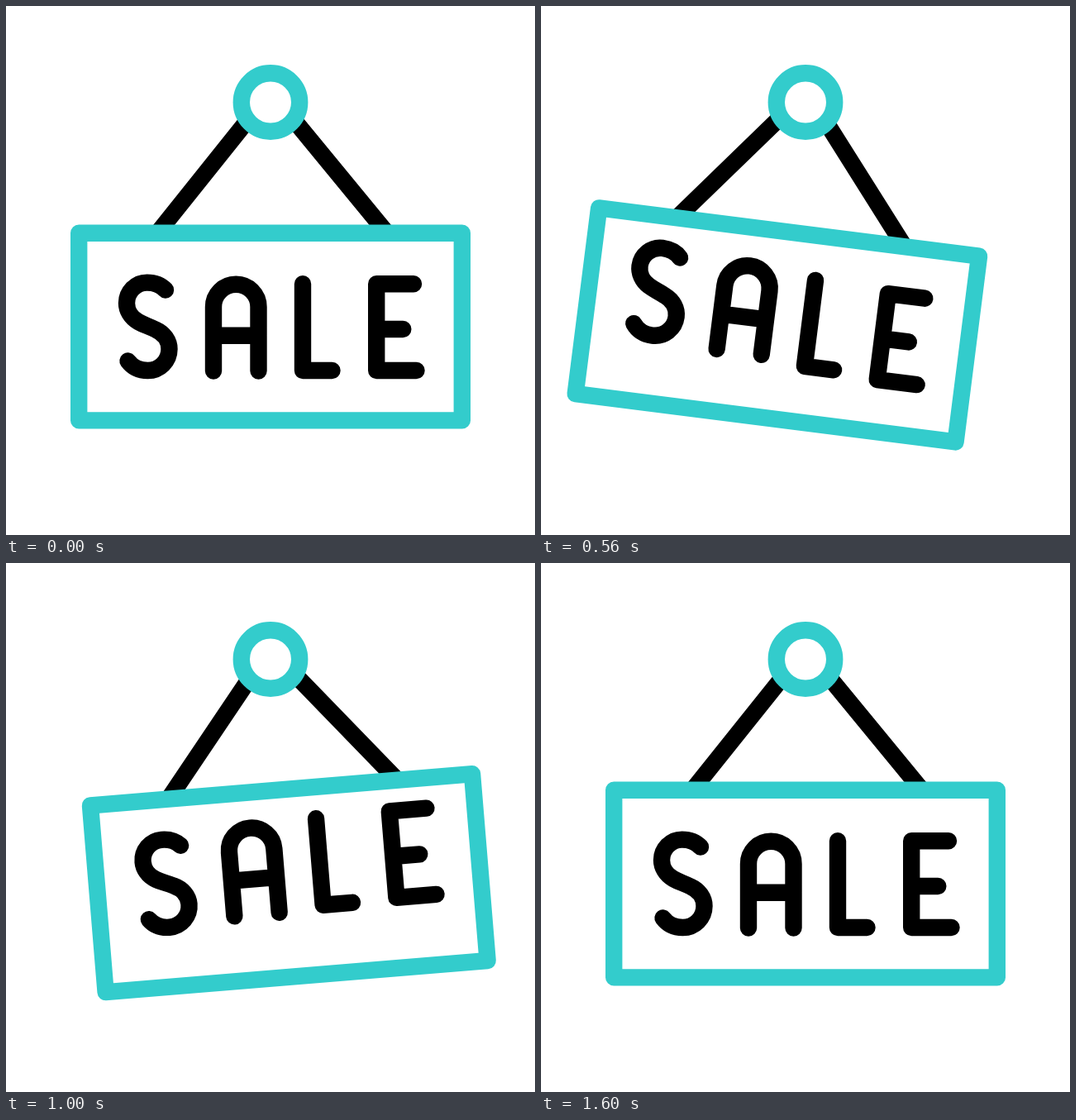
These frames come from a looping animation (640x640 px, 1680 ms). An HTML page with a canvas:

```html
<!DOCTYPE html>
<html lang="en">
<head>
<meta charset="utf-8">
<title>Swinging sale sign</title>
<style>
  html, body { margin: 0; width: 100%; height: 100%; overflow: hidden; background: #fff; }
  canvas { display: block; width: 100vw; height: 100vh; }
</style>
</head>
<body>
<canvas id="stage" width="640" height="640"></canvas>
<script>
const ctx = document.getElementById('stage').getContext('2d');

const LOOP = 1680, STEP = 40;
const TEAL = '#33cccc', LINE = 20.4;
const PIVOT = { x: 320, y: 116.5 };

// Swing keys: [time in ms, angle in degrees]
const SWING = [[40, 0], [480, 8], [880, -6], [1280, 3], [1600, 0]];

// Each letter lifts and settles, one after the other
const HOP = { height: 24.8, half: 540, firstPeak: 720, delay: 80 };

const LETTERS = [
  'M193 343.5 C187 337 179 334.6 170.5 334.6 C157 334.6 146 346 146 359.5 ' +
  'C146 368 151 377 160 382 C167 386 172 387 181 391.5 C191 396 197.5 405 197.5 415 ' +
  'C197.5 429.5 186 441 171.5 441 C162 441 153 437 147.5 429.5',
  'M251 441.5 V364 A27.25 27.25 0 0 1 305.5 364 V441.5 M251 398.7 H305.5',
  'M359 336.2 V441 H394.5',
  'M493 336.2 H448.2 V441 H496.5 M448.2 391 H480.3'
].map(d => new Path2D(d));

const ROPES = new Path2D('M291 140 L183 275 M350 140 L461 275');

// Symmetric cubic ease with handles of length 0.55
function ease(x) {
  if (x <= 0) return 0;
  if (x >= 1) return 1;
  const h = 0.55;
  let low = 0, high = 1, s = 0.5;
  for (let i = 0; i < 24; i++) {
    s = (low + high) / 2;
    const r = 1 - s;
    const at = 3 * h * s * r * r + 3 * (1 - h) * s * s * r + s * s * s;
    if (at < x) low = s; else high = s;
  }
  return s * s * (3 - 2 * s);
}

function swingAngle(t) {
  let angle = SWING[0][1];
  for (let i = 1; i < SWING.length; i++) {
    const [t0, a0] = SWING[i - 1], [t1, a1] = SWING[i];
    if (t >= t0) angle = a0 + (a1 - a0) * ease((t - t0) / (t1 - t0));
  }
  return angle * Math.PI / 180;
}

function letterLift(t, index) {
  const peak = HOP.firstPeak + index * HOP.delay;
  return HOP.height * (1 - ease(Math.abs(t - peak) / HOP.half));
}

function drawSign(t) {
  ctx.save();
  ctx.translate(PIVOT.x, PIVOT.y);
  ctx.rotate(swingAngle(t));
  ctx.translate(-PIVOT.x, -PIVOT.y);

  ctx.strokeStyle = '#000';
  ctx.lineCap = 'butt';
  ctx.stroke(ROPES);

  ctx.strokeStyle = TEAL;
  ctx.strokeRect(88.2, 274.8, 463.6, 226.6);

  ctx.strokeStyle = '#000';
  ctx.lineCap = 'round';
  LETTERS.forEach((letter, i) => {
    ctx.save();
    ctx.translate(0, -letterLift(t, i));
    ctx.stroke(letter);
    ctx.restore();
  });
  ctx.restore();
}

function drawRing() {
  ctx.strokeStyle = TEAL;
  ctx.fillStyle = '#fff';
  ctx.beginPath();
  ctx.arc(PIVOT.x, PIVOT.y, 35.2, 0, Math.PI * 2);
  ctx.fill();
  ctx.stroke();
}

function render(t) {
  ctx.fillStyle = '#fff';
  ctx.fillRect(0, 0, 640, 640);
  ctx.lineWidth = LINE;
  ctx.lineJoin = 'round';
  drawSign(t);
  drawRing();
}

const start = performance.now();
function tick() {
  const t = (performance.now() - start) % LOOP;
  render(Math.floor(t / STEP) * STEP);
  requestAnimationFrame(tick);
}
tick();
</script>
</body>
</html>
```
